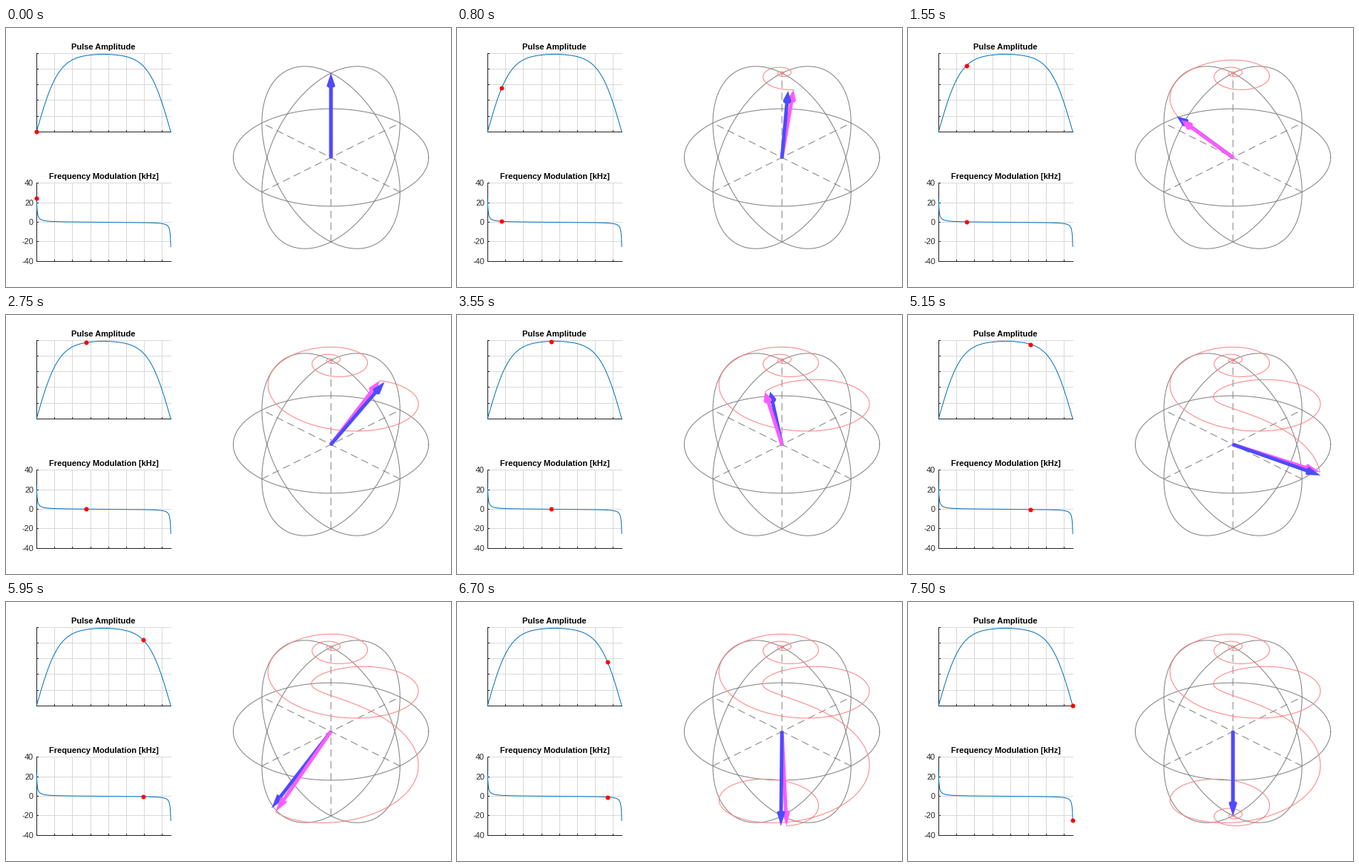
Recreate the animation shown at these times as a matplotlib script. Size 600x350 px, loop 7.55 s.

```python
import numpy as np
import matplotlib.pyplot as plt
from matplotlib.animation import FuncAnimation
from matplotlib.collections import PolyCollection

W, H, DPI = 600, 350, 100
PX = 72 / DPI
FRAMES, SUB = 151, 40
LAST = FRAMES - 1
LEAD = SUB // 4                    # vectors run a quarter frame ahead

plt.rcParams["font.family"] = "Liberation Sans"

# Adiabatic full passage: tanh amplitude, tan frequency sweep
XI = 3.0
KAPPA = np.arctan(80)
SWEEP = 25.0                       # kHz at both ends
PHASE_GAIN = np.radians(501)
PHASE_MID = np.radians(98.4)
RATE = 2 * KAPPA * PHASE_GAIN      # detuning scale, rad per pulse
B1 = 1.475 * RATE


def amplitude(t):
    return np.tanh(XI * (1 - np.abs(1 - 2 * t)))


def sweep(t):
    return np.tan(KAPPA * (1 - 2 * t))


def phase(t):
    return PHASE_MID + PHASE_GAIN * np.log(np.cos(KAPPA * (1 - 2 * t)))


def to_lab(vec, t):
    c, s = np.cos(phase(t)), np.sin(phase(t))
    x, y, z = vec.T
    return np.stack([c * x - s * y, s * x + c * y, z], axis=1)


def field_direction(t):
    b = np.stack([B1 * amplitude(t), 0 * t, RATE * sweep(t)], axis=1)
    return b, b / np.linalg.norm(b, axis=1, keepdims=True)


def simulate(t):
    """Bloch equation dM/dt = M x B in the frequency-modulated frame."""
    dt = t[1] - t[0]
    b, axis = field_direction((t[:-1] + t[1:]) / 2)
    angle = -np.linalg.norm(b, axis=1) * dt
    m = np.array([0.0, 0.0, 1.0])
    out = [m]
    for k, a in zip(axis, angle):
        m = (m * np.cos(a) + np.cross(k, m) * np.sin(a)
             + k * np.dot(k, m) * (1 - np.cos(a)))
        out.append(m)
    return np.array(out)


# Orthographic view, 30 degrees above the equator
CX, CY, R = 438.1, 175.0, 131.7
SIN_E, COS_E = 0.5, np.sqrt(0.75)


def project(p):
    x, y, z = np.asarray(p).T
    return np.stack([CX + R * x, CY - R * (COS_E * z + SIN_E * y)], axis=-1)


def depth(p):
    return -COS_E * p[1] + SIN_E * p[2]


def arrow_polys(p, shaft=2.4, head=5.6, head_len=0.15):
    """Shaft and cone outlines of a 3D arrow from the centre to p."""
    origin, base, tip = project([0 * p, (1 - head_len) * p, p])
    d = (tip - origin) / max(np.hypot(*(tip - origin)), 1e-6)
    n = np.array([-d[1], d[0]])
    squash = abs(depth(p))

    def arc(center, r, a0, a1):
        a = np.linspace(a0, a1, 16)[:, None]
        return center + r * (np.cos(a) * n + squash * np.sin(a) * d)

    rod = np.vstack([arc(origin, shaft, np.pi, 2 * np.pi),
                     arc(base, shaft, 0, np.pi)])
    cone = np.vstack([arc(base, head, np.pi, 2 * np.pi), tip])
    return [rod, cone]


t_fine = np.linspace(0, 1, LAST * SUB + 1)
spin = to_lab(simulate(t_fine), t_fine)
field = to_lab(field_direction(t_fine)[1], t_fine)
trail_xy = project(spin)

fig = plt.figure(figsize=(W / DPI, H / DPI), dpi=DPI, facecolor="white")
ax = fig.add_axes([0, 0, 1, 1])
ax.set_xlim(0, W)
ax.set_ylim(H, 0)
ax.axis("off")


def line(x, y, color, z=2, width=1.0, **kw):
    return ax.plot(x, y, color=color, lw=width * PX, zorder=z, **kw)[0]


# Left panels; straight lines snap to whole pixels, curves sit half a pixel lower
X0, X1 = 41.2, 222.1
AMP_TOP, AMP_BOTTOM = 34.3, 139.6
FREQ_TOP, FREQ_BOTTOM = 209.3, 314.6
HALF = 0.5
INK, GRID, BLUE = "#262626", "#d9d9d9", "#0072bd"


def panel(top, bottom, rows, title):
    xs = [X0 + (X1 - X0) * k / 7.5 for k in range(8)]
    ys = np.linspace(top, bottom, rows + 1)
    for x in xs[1:]:
        line([x, x], [top, bottom], GRID, 1)
        line([x, x], [bottom - 2, bottom], INK, 3)
    for y in ys[:-1]:
        line([X0, X1], [y, y], GRID, 1)
        line([X0, X0 + 2], [y, y], INK, 3)
    line([X0, X0], [top, bottom], INK, 3)
    line([X0, X1], [bottom, bottom], INK, 3)
    ax.text((X0 + X1) / 2, top - 5.3, title, ha="center", va="baseline",
            fontsize=11 * PX, weight="bold", color="black")
    return ys


panel(AMP_TOP, AMP_BOTTOM, 5, "Pulse Amplitude")
for y, v in zip(panel(FREQ_TOP, FREQ_BOTTOM, 4, "Frequency Modulation [kHz]"),
                range(40, -41, -20)):
    ax.text(37.2, y + 1, str(v), ha="right", va="center",
            fontsize=11 * PX, color=INK)


def amp_y(t):
    return AMP_BOTTOM + HALF - (AMP_BOTTOM - AMP_TOP) * amplitude(t)


def freq_y(t):
    khz = SWEEP * sweep(t) / np.tan(KAPPA)
    return FREQ_TOP + HALF + (FREQ_BOTTOM - FREQ_TOP) * (40 - khz) / 80


t_plot = np.linspace(0, 1, 601)
for curve in (amp_y, freq_y):
    line(X0 + (X1 - X0) * t_plot, curve(t_plot), BLUE, 4)
dots, = ax.plot([], [], "o", color="red", ms=6 * PX, mew=0, zorder=5)

# Sphere wireframe
GRAY = "#808080"
a = np.linspace(0, 2 * np.pi, 241)
h = np.sqrt(0.5)
zero = 0 * a
for ring in ([np.cos(a), np.sin(a), zero],
             [h * np.cos(a), h * np.cos(a), np.sin(a)],
             [h * np.cos(a), -h * np.cos(a), np.sin(a)]):
    line(*project(np.transpose(ring)).T, GRAY)
for end in ([0, 0, 1], [-h, h, 0], [h, h, 0]):
    e = np.array(end, float)
    line(*project([-e, e]).T, GRAY, dashes=(10, 6), dash_capstyle="butt",
         snap=False)

trail = line([], [], "#ff8080", 3)
spin_arrow = PolyCollection([], facecolor="#ff5cff", edgecolor="none", zorder=7)
field_arrow = PolyCollection([], facecolor="#4c4cff", edgecolor="none", zorder=8)
ax.add_collection(spin_arrow, autolim=False)
ax.add_collection(field_arrow, autolim=False)


def update(i):
    t = i / LAST
    k = min(i * SUB + LEAD, LAST * SUB) if i else 0
    x = X0 + (X1 - X0) * t
    dots.set_data([x, x], [amp_y(t), freq_y(t)])
    trail.set_data(*trail_xy[:k + 1].T)
    m, b = spin[k], field[k]
    spin_arrow.set_verts(arrow_polys(m))
    field_arrow.set_verts(arrow_polys(b))
    spin_arrow.set_zorder(9 if depth(m) > depth(b) + 0.005 else 7)
    return dots, trail, spin_arrow, field_arrow


anim = FuncAnimation(fig, update, frames=FRAMES, interval=50,
                     init_func=lambda: update(0), repeat=True)
plt.show()
```
